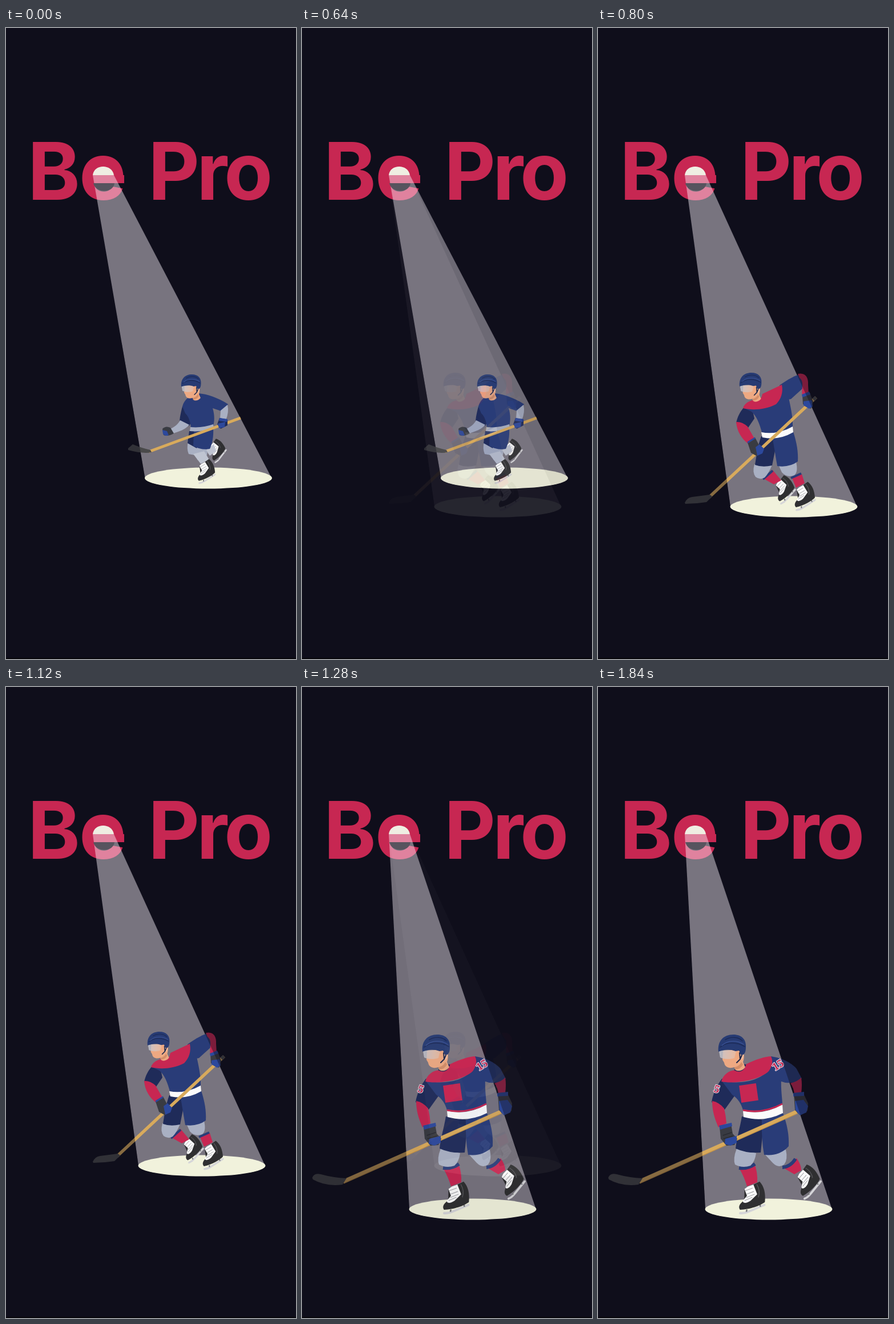
An HTML page with a canvas for the animation above (1920 ms loop, 508 px wide and 1102 px high).

```html
<!DOCTYPE html>
<html lang="en">
<head>
<meta charset="utf-8">
<title>Be Pro</title>
<style>
html, body { margin: 0; width: 100%; height: 100%; overflow: hidden; background: #0f0e1b; }
canvas { display: block; width: 100%; height: 100%; }
</style>
</head>
<body>
<canvas id="stage" width="508" height="1102"></canvas>
<script>
const W = 508, H = 1102, LOOP = 1920, STEP = 80;
const BG = '#0f0e1b', RED = '#c72752', NAVY = '#293c78', DARK = '#1f2b59',
  BLUE = '#2c489c', GREY = '#a9b0c3', BLACK = '#2f2f31', GLOVE = '#393b42',
  WOOD = '#d8aa5c', BLADE = '#49494a', WHITE = '#fbfbfb', SKIN = '#eea982';
const DOME = 'M152 257C154 237 186 237 189 257Z';

let g;

function fill(color, d) {
  g.fillStyle = color;
  g.fill(new Path2D(d));
}

function line(color, width, d, cap = 'round') {
  g.strokeStyle = color;
  g.lineWidth = width;
  g.lineCap = cap;
  g.lineJoin = 'round';
  g.stroke(new Path2D(d));
}

function at(x, y, scale, degrees, draw) {
  g.save();
  g.translate(x, y);
  g.rotate(degrees * Math.PI / 180);
  g.scale(scale, scale);
  draw();
  g.restore();
}

// Place a glyph by the left edge of its ink.
function glyph(ch, left, base) {
  g.fillText(ch, left + g.measureText(ch).actualBoundingBoxLeft, base);
}

function title() {
  g.font = '700 139px Inter, sans-serif';
  g.fillStyle = RED;
  [['B', 47], ['e', 133], ['P', 258], ['r', 342], ['o', 387]]
    .forEach(([ch, x]) => glyph(ch, x, 300));
  // Close the counter of the e around the lamp.
  line(RED, 9, DOME);
  g.fillStyle = RED;
  g.fillRect(150, 257, 57, 14);
}

function beamPath(cx, cy) {
  return `M152 257L189 257L${cx + 111} ${cy}L${cx - 111} ${cy}Z`;
}

function light(cx, cy) {
  fill('rgba(255,246,255,.44)', beamPath(cx, cy));
  fill('#57545e', 'M153 271L190 271C188 289 157 289 153 271Z');
  fill('#efeee2', DOME);
  g.fillStyle = '#f1f2dc';
  g.beginPath();
  g.ellipse(cx, cy, 111.5, 18.5, 0, 0, 7);
  g.fill();
}

// Everything beyond the cone falls into shade.
function shade(cx, cy) {
  const lit = new Path2D(beamPath(cx, cy));
  lit.ellipse(cx, cy, 112, 19, 0, 0, 7);
  const mask = document.createElement('canvas');
  mask.width = W;
  mask.height = H;
  const m = mask.getContext('2d');
  m.fillStyle = BG;
  m.fillRect(0, 550, W, H - 552);
  m.globalCompositeOperation = 'destination-out';
  m.fill(lit);
  g.globalAlpha = 0.4;
  g.drawImage(mask, 0, 0);
  g.globalAlpha = 1;
}

function head(x, y, scale) {
  at(x, y, scale, 0, () => {
    fill(SKIN, 'M8 28L37 26C44 28 47 36 43 48L47 57C42 64 33 65 29 61L28 57C19 60 11 57 10 49L7 44Z');
    fill('#d48e68', 'M28 57Q36 56 40 48L43 52Q39 61 29 61Z');
    fill('#f5bd9d', 'M38 31Q45 29 44 38Q42 46 37 43Z');
    const visor = g.createLinearGradient(2, 34, 31, 36);
    visor.addColorStop(0, '#c3c4cddd');
    visor.addColorStop(1, '#d9d4d555');
    fill(visor, 'M1 29C10 27 23 26 31 29L28 41C20 44 9 43 3 40Z');
    fill('#273b73', 'M0 30C-2 11 9 0 26 0C41 0 49 9 48 22C48 31 45 37 39 35L36 28L30 29C20 25 9 26 0 30Z');
    line('#1c2b59', 1.6, 'M3 22C14 12 33 13 46 21M12 9C22 3 35 4 42 11');
    line('#3b5396', 1.4, 'M6 19C17 9 33 10 44 17');
    line('#1b274c', 2, 'M37 32L38 43L32 49M38 43L41 36');
  });
}

function skate(x, y, scale, degrees) {
  at(x, y, scale, degrees, () => {
    line('#d5d5d8', 4, 'M1 0Q8 1 15 -2L44 -13');
    line('#77787b', 2.5, 'M13 -6L12 -2M36 -14L37 -10', 'butt');
    fill(BLACK, 'M10 -42L37 -54C45 -45 47 -32 45 -18C37 -12 18 -6 1 -6C-3 -12 2 -18 9 -22Z');
    fill(WHITE, 'M10 -42L16 -46L26 -49L32 -32L20 -21C12 -16 5 -17 7 -22L14 -30Z');
    line('#a5a6aa', 1.1, 'M12 -39L24 -43M14 -33L26 -37M13 -27L27 -32M10 -22L23 -27');
    line('#555559', 1.5, 'M32 -49Q38 -38 34 -27');
  });
}

function number(text, x, y, size, degrees) {
  at(x, y, 1, degrees, () => {
    g.font = `700 ${size}px "Noto Serif", serif`;
    g.textAlign = 'center';
    g.lineJoin = 'round';
    g.lineWidth = 2.4;
    g.strokeStyle = '#dcd3de';
    g.strokeText(text, 0, size * 0.36);
    g.fillStyle = RED;
    g.fillText(text, 0, size * 0.36);
    g.textAlign = 'left';
  });
}

function rookie() {
  skate(366, 759, 0.64, -32);
  fill('#bfc4d1', 'M350 737L364 727L368 739L357 747Z');
  fill(GREY, 'M319 722L348 733C355 739 353 746 349 750L336 755L331 746L320 744Q316 735 319 722Z');
  fill('#bfc4d1', 'M328 744L347 739L356 754L341 761Z');
  skate(338, 795, 0.7, -12);
  fill(DARK, 'M309 661C305 676 304 684 304 689L321 695L327 683L319 655Z');
  fill(GREY, 'M305 685L321 693C315 701 302 705 293 708L288 700C297 696 302 691 305 685Z');
  fill(DARK, 'M321 704L342 702L334 734L318 725Z');
  fill(NAVY, 'M329 704L363 698C364 714 361 727 357 735Q343 738 328 730Z');
  fill(NAVY, 'M309 661C312 648 324 640 337 638C352 639 372 646 389 657L383 671L362 664C366 677 365 688 363 695L324 699C323 686 319 677 314 673Z');
  fill(GREY, 'M323 697Q344 699 363 692L364 699Q344 706 322 704Z');
  fill(GREY, 'M376 668L388 658Q391 671 385 685L375 683Z');
  head(307, 605, 0.72);
  line(WOOD, 5, 'M250 740L411 681', 'butt');
  fill(BLADE, 'M214 734L222 727Q236 733 253 737L255 741Q240 744 214 737Z');
  fill(GLOVE, 'M274 700Q280 694 288 698L294 708Q284 714 276 711Z');
  fill(BLUE, 'M274 702L282 704L285 711Q279 714 275 709Z');
  fill(DARK, 'M374 681L388 684L388 694L376 700L370 692Z');
  fill(BLUE, 'M374 681L388 683L387 688L373 686ZM371 691L384 688L383 697L373 699Z');
}

function amateur() {
  skate(320, 831, 0.77, -28);
  skate(347, 842, 0.82, -12);
  fill(RED, 'M290 787L306 772L321 790L308 797Z');
  fill(RED, 'M340 786L357 779L362 795L347 803Z');
  line(NAVY, 4, 'M289 788L306 773M338 786L356 778', 'butt');
  fill(GREY, 'M274 762L305 763Q299 778 292 785Q284 790 276 784Q270 776 274 762Z');
  fill(GREY, 'M317 765L347 758Q351 775 344 781Q331 786 322 776Z');
  fill(DARK, 'M286 713L314 718L305 764Q288 768 275 763C278 745 280 729 286 713Z');
  fill(NAVY, 'M306 718L342 705C348 724 351 740 350 757Q335 768 314 765Z');
  fill(DARK, 'M256 662C248 671 244 680 242 690L263 698L274 682L270 664Z');
  fill(RED, 'M242 688Q252 687 262 696L274 717L263 726C252 718 243 704 242 688Z');
  fill(NAVY, 'M254 663C275 669 309 663 321 632L333 641C337 660 342 680 341 699Q314 712 287 706C283 691 278 678 269 670Z');
  fill(NAVY, 'M318 624C334 613 346 606 357 604L359 629L338 648C328 651 318 644 318 633Z');
  fill(RED, 'M254 664C257 654 266 651 275 649Q286 652 288 639L322 623C325 637 320 649 312 657C293 667 270 668 254 664Z');
  fill(WHITE, 'M286 706Q314 711 341 696L342 706Q316 721 288 715Z');
  fill(RED, 'M350 604C363 601 369 610 368 623L369 640L358 642C356 629 362 618 353 611Z');
  head(248, 602, 0.8);
  line(WOOD, 5.4, 'M194 820L382 645', 'butt');
  line(BLADE, 5.5, 'M377 649L382 645', 'butt');
  fill(BLADE, 'M152 829Q156 820 165 819L196 815L200 818L190 828Q172 831 153 831Z');
  fill(GLOVE, 'M262 724L275 715L285 734L279 748L268 742Z');
  fill(BLUE, 'M276 732L283 727L291 735L288 743L279 747Z');
  line(BLUE, 3, 'M262 724L275 716', 'butt');
  fill(GLOVE, 'M358 641L371 637L377 653L373 665L359 657Z');
  fill(BLUE, 'M357 640L370 635L372 640L358 645ZM360 652L374 650L376 661L370 665L360 659Z');
}

function pro() {
  skate(248, 919, 1, -2);
  skate(361, 894, 0.92, -30);
  fill(RED, 'M247 840L274 832Q280 848 279 865L261 872Q256 855 247 840Z');
  fill(RED, 'M325 840L348 823Q356 834 356 844L344 851Z');
  line(NAVY, 6, 'M247 840Q262 842 275 833M323 839Q337 838 346 824', 'butt');
  fill(GREY, 'M243 806L277 814Q275 829 267 836Q253 841 240 834Q236 824 243 806Z');
  fill(GREY, 'M293 817L329 808Q333 825 326 834Q316 841 306 831Z');
  fill(DARK, 'M252 750L291 756L285 813Q261 815 241 806C243 787 249 769 252 750Z');
  fill(NAVY, 'M287 756L324 744C331 764 335 781 334 802Q318 820 291 817Q286 790 287 756Z');
  fill(DARK, 'M217 684C208 696 201 711 199 725L222 738L240 713L233 688Z');
  fill(RED, 'M200 723Q212 725 221 736Q224 749 225 762L211 769C204 753 200 740 200 723Z');
  fill(NAVY, 'M216 687C246 695 288 690 303 662L321 684C320 704 323 719 323 730Q289 747 254 739C251 727 244 718 235 712Z');
  fill(NAVY, 'M303 645C324 648 341 658 348 667L357 684Q347 693 328 691L318 688L302 671Z');
  fill(RED, 'M216 689C219 677 229 670 240 669Q254 674 259 659C277 650 294 645 303 645Q309 657 299 671C284 686 239 694 216 689Z');
  line(DARK, 3, 'M239 668Q253 675 258 659', 'butt');
  fill(WHITE, 'M254 740Q289 749 323 729L324 744Q291 761 255 751Z');
  line(RED, 3, 'M254 739Q289 746 323 728', 'butt');
  fill(RED, 'M337 692Q350 689 356 682Q358 695 356 709L344 711Q343 700 337 692Z');
  at(264, 709, 1, -8, () => {
    g.fillStyle = RED;
    g.fillRect(-15, -15, 30, 30);
  });
  number('5', 208, 702, 18, 16);
  number('15', 315, 660, 18, -32);
  head(211, 607, 1);
  line(WOOD, 7, 'M72 864L348 742', 'butt');
  line('#bd8d45', 1.2, 'M73 867L349 745', 'butt');
  fill(BLADE, 'M18 857Q21 848 33 851Q55 857 78 858L71 869Q42 873 19 860Z');
  fill(GLOVE, 'M213 768L233 763L236 780L244 789L239 800L225 801L215 789Z');
  fill(BLUE, 'M212 766L234 761L235 767L214 773ZM223 789L243 784L243 796L232 801L222 798Z');
  line('#24262c', 1.2, 'M219 783L234 778M220 789L236 784');
  fill(GLOVE, 'M343 711L360 710L368 727L367 740L354 748L345 739Z');
  fill(BLUE, 'M342 709L361 707L361 714L342 715ZM345 723L360 721L368 732L365 743L354 748L346 739Z');
}

function scene(cx, cy, player) {
  const c = document.createElement('canvas');
  c.width = W;
  c.height = H;
  g = c.getContext('2d');
  g.fillStyle = BG;
  g.fillRect(0, 0, W, H);
  g.fillStyle = '#06050a';
  g.fillRect(0, 1100, W, 2);
  title();
  light(cx, cy);
  player();
  shade(cx, cy);
  return c;
}

const scenes = [
  scene(354.5, 786, rookie),
  scene(343, 836, amateur),
  scene(299, 912, pro)
];
const out = document.getElementById('stage').getContext('2d');

function fade(t, start, length) {
  const u = Math.min(1, Math.max(0, (t - start) / length));
  return u < 0.5 ? 4 * u ** 3 : 1 - 4 * (1 - u) ** 3;
}

function render(now) {
  const t = Math.floor(now % LOOP / STEP) * STEP;
  [1, fade(t, 575, 220), fade(t, 1120, 210)].forEach((alpha, i) => {
    out.globalAlpha = alpha;
    out.drawImage(scenes[i], 0, 0);
  });
}

const begin = performance.now();
function tick() {
  render(performance.now() - begin);
  requestAnimationFrame(tick);
}
tick();
</script>
</body>
</html>
```
